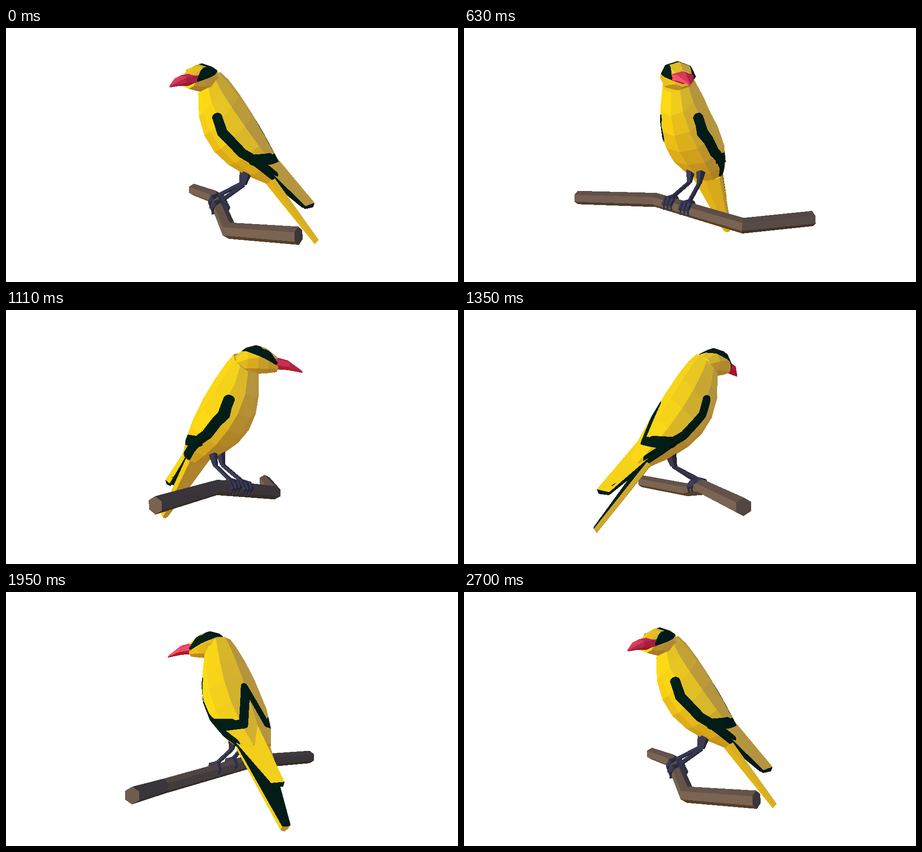
Animation, 998 px wide and 561 px high, one loop 2730 ms. Source, as an HTML page with a canvas:

```html
<!DOCTYPE html>
<html lang="en">
<head>
<meta charset="utf-8">
<title>Perched bird turntable</title>
<style>
html, body { margin: 0; width: 100%; height: 100%; overflow: hidden; background: #fff; }
canvas { display: block; width: 998px; height: 561px; }
</style>
</head>
<body>
<canvas id="stage" width="998" height="561"></canvas>
<script>
const W = 998, H = 561, CX = 493, HORIZON = 225, DIST = 1150;
const LOOP = 2730, TURN = 2700, STEP = 30;
const LIGHT = [-0.81, -0.1, 0.57];

// Each material runs from its shaded to its lit colour.
const YELLOW = [[180, 148, 62], [255, 219, 22]];
const DARK = [[2, 27, 24], [3, 34, 29]];
const PINK = [[165, 28, 68], [250, 82, 108]];
const WOOD = [[58, 53, 58], [126, 102, 84]];
const LEG = [[36, 38, 60], [66, 67, 94]];

const { sin, cos, PI, min, max, abs } = Math;
const sub = (a, b) => a.map((v, i) => v - b[i]);
const dot = (a, b) => a[0] * b[0] + a[1] * b[1] + a[2] * b[2];
const cross = (a, b) => [a[1] * b[2] - a[2] * b[1], a[2] * b[0] - a[0] * b[2], a[0] * b[1] - a[1] * b[0]];
const unit = a => { const l = Math.hypot(...a) || 1; return a.map(v => v / l); };
const range = n => Array.from({ length: n }, (_, i) => i);
const steps = n => range(n).map(i => i / (n - 1));
const around = n => range(n).map(k => k / n * 2 * PI);

const bezier = (p, q, r, s) => t => p.map((v, i) =>
  (1 - t) ** 3 * v + 3 * t * (1 - t) ** 2 * q[i] + 3 * t * t * (1 - t) * r[i] + t ** 3 * s[i]);

// A frame standing at (ox, oz), looking along an azimuth in degrees.
function frame(deg, ox, oz) {
  const s = sin(deg * PI / 180), c = cos(deg * PI / 180);
  return ([a, y, b]) => [ox + a * s + b * c, y, oz + a * c - b * s];
}
const world = p => p;
const bird = frame(-80, 3, 0);
const head = frame(-36, -59, 24);

// True when (x, y) lies within r of a polyline.
function near(path, x, y, r) {
  return path.some(([bx, by], i) => {
    if (!i) return false;
    const [ax, ay] = path[i - 1], dx = bx - ax, dy = by - ay;
    const t = min(1, max(0, ((x - ax) * dx + (y - ay) * dy) / (dx * dx + dy * dy)));
    return (x - ax - t * dx) ** 2 + (y - ay - t * dy) ** 2 < r * r;
  });
}

const faces = [];
const face = (pts, place, mat, mark) => faces.push({ local: pts, pos: pts.map(place), mat, mark });

// Joins rings into a closed body; mats repeat around each ring.
function skin(rings, place, mats, mark) {
  const n = rings[0].length;
  rings.forEach((ring, i) => {
    if (i) range(n).forEach(k => {
      const m = (k + 1) % n, prev = rings[i - 1];
      face([prev[k], prev[m], ring[m], ring[k]], place, mats[k % mats.length], mark);
    });
  });
  face(rings[0], place, mats[0], mark);
  face(rings[rings.length - 1], place, mats[0], mark);
}

function tube(pts, radii, sides, mat) {
  skin(pts.map((p, i) => {
    const d = unit(sub(pts[min(i + 1, pts.length - 1)], pts[max(i - 1, 0)]));
    const side = unit(cross(d, [0, 1, 0])), up = cross(side, d);
    const r = radii[min(i, radii.length - 1)];
    return around(sides).map(a => p.map((v, j) => v + r * (up[j] * cos(a) + side[j] * sin(a))));
  }), world, [mat]);
}

// Mirrors half a cross-section, listed from the keel to the ridge.
const mirror = half => [...half, ...half.slice(1, -1).reverse().map(([u, y, v]) => [u, y, -v])];
const wedge = (from, to, mats) => skin([mirror(from), mirror(to)], bird, [...mats, ...[...mats].reverse()]);

// Dark bands on the flank (length, height) and the back (half width, height).
const FLANK = [[37, -26], [27, 6], [-14, 49], [-40, 64], [-88, 99]];
const RUMP = [[-40, 64], [-76, 62]];
const BACK = [[0, -14], [28, 60], [60, 66]];
const wingMark = (u, y, v) => near(FLANK, u, y, 10) || near(RUMP, u, y, 12) ||
  (u < -10 - 0.7 * y && near(BACK, abs(v), y, 9));
const capMark = (a, y, s) => y < -117 + 0.44 * a && !(a > 11 && abs(s) < 21);

// Torso: elliptical rings hung between the breast and back curves.
const breast = bezier([72, -80], [80, 30], [20, 85], [-83, 121]);
const back = bezier([24, -128], [-4, -115], [-90, 25], [-124, 100]);
skin(steps(7).map(t => {
  const [fu, fy] = breast(t), [bu, by] = back(t), w = 33 + 36 * sin(PI * t ** 1.36);
  return around(10).map(a => {
    const c = (1 + cos(a)) / 2;
    return [bu + (fu - bu) * c, by + (fy - by) * c, w * sin(a)];
  });
}), bird, [YELLOW], wingMark);

// Head and beak: distance forward, centre height, half width, half height.
const oval = (n, a, y, w, h) => around(n).map(k => [a, y - h * cos(k), w * sin(k)]);
skin(steps(5).map(i => {
  const t = 2 * i - 1;
  return oval(8, 45 * t, -113 + 10 * t * t, 38 * cos(t), 31 * cos(t));
}), head, [YELLOW], capMark);
skin(steps(3).map(t => oval(6, 38 + 64 * t, -106 + 19 * t * t, 25 - 23 * t * t, 13.5 - 11.5 * t * t)), head, [PINK]);

// Folded wing tips, then the tail beneath them.
wedge([[-90, 95, 0], [-66, 92, 44], [-68, 80, 48], [-105, 62, 0]],
  [[-190, 176, 0], [-168, 178, 9], [-168, 171, 12], [-194, 166, 0]], [DARK, DARK, YELLOW]);
wedge([[-78, 118, 0], [-82, 112, 36], [-90, 105, 40], [-92, 104, 0]],
  [[-194, 260, 0], [-193, 256, 9], [-200, 248, 10], [-201, 249, 0]], [YELLOW, YELLOW, DARK]);

// Perch, legs and toes curled round it.
const elbow = [-33, 157, -64], bend = [0, 194, 148];
tube([[-96, 162, -262], elbow, bend, [121, 185, 240]], [16], 6, WOOD);
const perch = z => elbow.map((v, i) => v + (bend[i] - v) * (z - elbow[2]) / (bend[2] - elbow[2]));
function toe(z, spread, way) {
  const [x, y] = perch(z);
  tube(range(4).map(i => [x + way * 18 * sin(i * 0.7), y - 18 * cos(i * 0.7), z + spread * min(1, i)]), [5.5, 5.5, 5, 3.5], 5, LEG);
}
for (const side of [-1, 1]) {
  const z = 1 + 21 * side, [x, y] = perch(z), knee = bird([-27, 120, 13 * side]);
  tube([bird([-36, 84, 14 * side]), knee], [13, 6], 5, LEG);
  tube([knee, [x, y - 17, z]], [5], 5, LEG);
  for (const spread of [-10, 0, 10]) toe(z, spread, -1);
  toe(z, 0, 1);
}

const ctx = document.getElementById('stage').getContext('2d');
const image = ctx.createImageData(W, H);
const pixels = new Uint32Array(image.data.buffer);
const depth = new Float32Array(W * H);

// Packed colour for a material under the fixed light; undersides turn warmer.
function tint([lo, hi], n) {
  const k = min(1, max(0, 0.08 + 0.95 * dot(n, LIGHT))), under = max(0, n[1]);
  const [r, g, b] = lo.map((v, i) => (v + (hi[i] - v) * k) * (1 - under * [0.06, 0.18, 0.45][i]));
  return (255 << 24 | b << 16 | g << 8 | r) >>> 0;
}

function triangle(A, B, C, la, lb, lc, base, dark, mark) {
  const area = (B[0] - A[0]) * (C[1] - A[1]) - (B[1] - A[1]) * (C[0] - A[0]);
  if (abs(area) < 1e-6) return;
  const lowest = (i, size) => max(0, Math.floor(min(A[i], B[i], C[i])));
  const highest = (i, size) => min(size - 1, Math.ceil(max(A[i], B[i], C[i])));
  const x0 = lowest(0), x1 = highest(0, W), y1 = highest(1, H);
  for (let y = lowest(1); y <= y1; y++) {
    for (let x = x0; x <= x1; x++) {
      const px = x + 0.5 - A[0], py = y + 0.5 - A[1];
      const b = (px * (C[1] - A[1]) - py * (C[0] - A[0])) / area;
      const c = ((B[0] - A[0]) * py - (B[1] - A[1]) * px) / area;
      const a = 1 - b - c;
      if (a < -1e-6 || b < -1e-6 || c < -1e-6) continue;
      const s = a * A[2] + b * B[2] + c * C[2], i = y * W + x;
      if (s <= depth[i]) continue;
      depth[i] = s;
      const mix = j => a * la[j] + b * lb[j] + c * lc[j];
      pixels[i] = mark && mark(mix(0), mix(1), mix(2)) ? dark : base;
    }
  }
}

function draw(turn) {
  const c = cos(turn), s = sin(turn);
  pixels.fill(0xffffffff);
  depth.fill(0);
  for (const { local, pos, mat, mark } of faces) {
    const view = pos.map(([x, y, z]) => [x * c + z * s, y, z * c - x * s]);
    const flat = view.map(([x, y, z]) => {
      const k = DIST / (DIST - z);
      return [CX + x * k, HORIZON + y * k, k];
    });
    const last = view.length - 1;
    let n = unit(cross(sub(view[2], view[0]), sub(view[last], view[1])));
    if (dot(n, sub([0, 0, DIST], view[0])) < 0) n = n.map(v => -v);
    const base = tint(mat, n), dark = tint(DARK, n);
    for (let i = 1; i < last; i++) {
      triangle(flat[0], flat[i], flat[i + 1], local[0], local[i], local[i + 1], base, dark, mark);
    }
  }
  ctx.putImageData(image, 0, 0);
}

const start = performance.now();
let shown = -1;
function tick() {
  const step = Math.floor(max(0, performance.now() - start) % LOOP / STEP);
  if (step !== shown) {
    shown = step;
    const t = min(1, step * STEP / TURN);
    draw(2 * PI * t * t * (3 - 2 * t));
  }
  requestAnimationFrame(tick);
}
tick();
</script>
</body>
</html>
```
